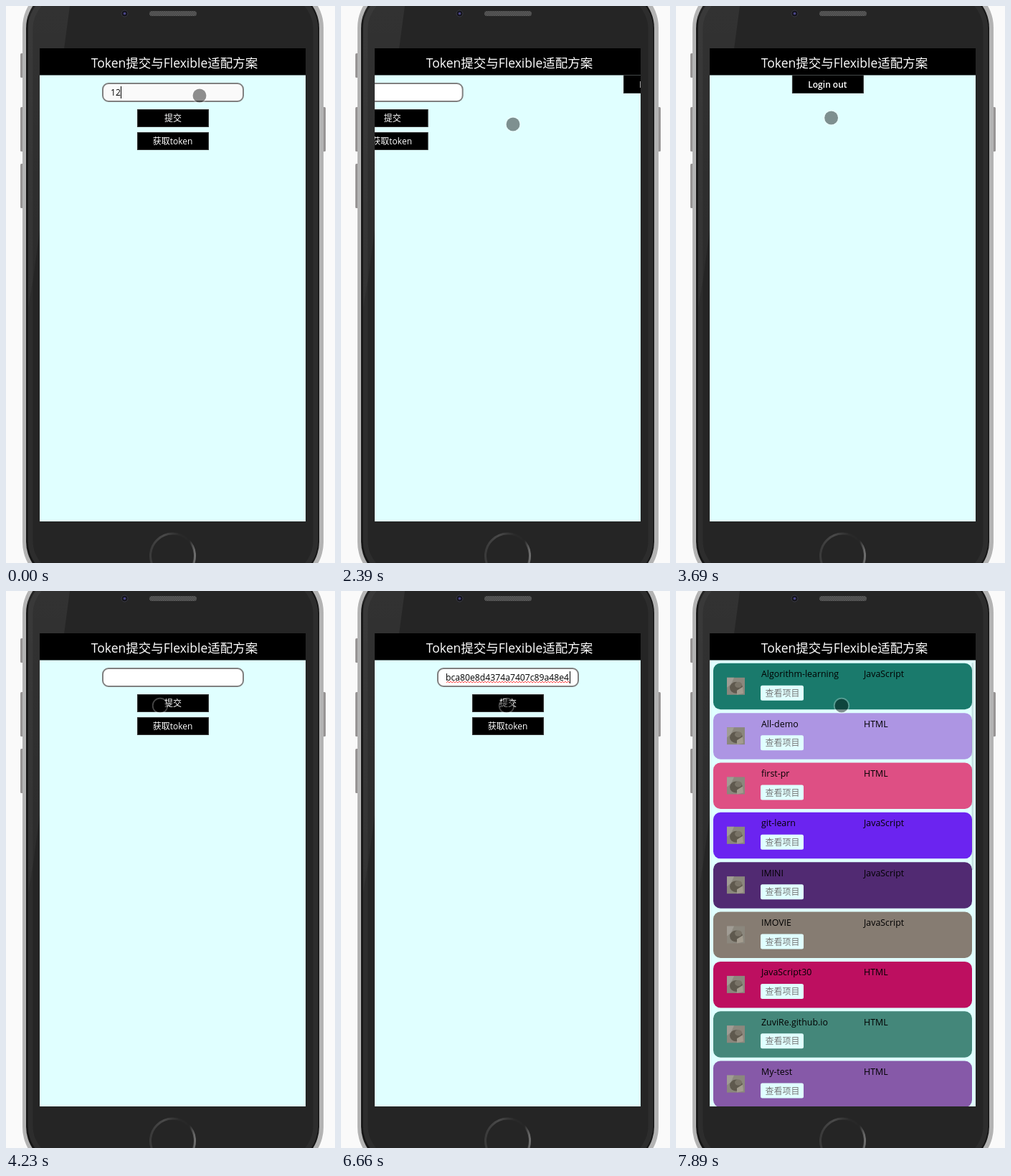
An HTML page for the animation above (8 s loop, 459 by 777 pixels).

```html
<!DOCTYPE html>
<html lang="zh">
<head>
<meta charset="utf-8">
<title>Token</title>
<style>
  html, body { margin: 0; width: 100%; height: 100%; overflow: hidden; background: #fafafa; }
  svg { display: block; }
  text { font: 12px "Open Sans", "Noto Sans CJK SC", "Noto Sans CJK", sans-serif; white-space: pre; }
  .mid { text-anchor: middle; fill: #fff; }
  #title { font-size: 17.5px; }
  #typed { font-size: 12.2px; }
  .label { font-size: 12.4px; }
  .open { fill: #777; }
</style>
</head>
<body>
<svg width="459" height="777" viewBox="0 0 459 777">
  <defs>
    <linearGradient id="shine" x2="0" y2="1">
      <stop stop-color="#fff" stop-opacity=".06"/>
      <stop offset="1" stop-color="#fff" stop-opacity=".03"/>
    </linearGradient>
    <linearGradient id="homeRing">
      <stop stop-color="#3a3a3a"/>
      <stop offset=".3" stop-color="#4a4a4a"/>
      <stop offset=".65" stop-color="#2a2a2a"/>
      <stop offset=".88" stop-color="#262626"/>
      <stop offset="1" stop-color="#707070"/>
    </linearGradient>
    <pattern id="mesh" width="3" height="3" patternUnits="userSpaceOnUse">
      <rect width="3" height="3" fill="#3c3c3c"/>
      <path d="M0 0h1.5v1.5h-1.5zM1.5 1.5h1.5v1.5h-1.5z" fill="#666"/>
    </pattern>
    <g id="avatar">
      <rect width="25" height="24" fill="#8b877d"/>
      <path d="M0 0h10l-4 9-6 5z" fill="#a09c94"/>
      <ellipse cx="13" cy="14" rx="9" ry="8" fill="#5f594e"/>
      <ellipse cx="16" cy="10" rx="5" ry="4" fill="#7a7468"/>
      <path d="M14 18l8-5 1 9-9 2z" fill="#a39c8f"/>
    </g>
  </defs>

  <g fill="#979494">
    <rect x="20" y="66" width="5" height="34" rx="1.5"/>
    <rect x="20" y="141" width="5" height="62" rx="1.5"/>
    <rect x="20" y="220" width="5" height="62" rx="1.5"/>
    <rect x="441" y="141" width="5" height="62" rx="1.5"/>
  </g>
  <rect x="23" y="-30" width="420" height="838" rx="60" fill="#b3b3b3"/>
  <rect x="28" y="-25" width="409" height="828" rx="56" fill="#161616"/>
  <rect x="30.5" y="-22" width="405" height="822" rx="54" fill="#2d2d2d"/>
  <rect x="37.5" y="-16" width="391" height="810" rx="48" fill="#252525"/>
  <path d="M31 0H89L38 380L31 420z" fill="url(#shine)"/>
  <circle cx="165.500" cy="10.500" r="4.500" fill="#15151d" stroke="#3b3b44"/>
  <circle cx="165.500" cy="10.500" r="1.800" fill="#4b4688"/>
  <rect x="200" y="7" width="66" height="7" rx="3.500" fill="url(#mesh)"/>
  <circle cx="232.500" cy="767" r="31" fill="none" stroke="url(#homeRing)" stroke-width="3"/>

  <rect x="47" y="59" width="371" height="38" fill="#000"/>
  <text id="title" class="mid" x="235" y="86">Token提交与Flexible适配方案</text>

  <svg x="47" y="96.500" width="371" height="622.500" viewBox="47 96.500 371 622.500">
    <rect x="47" y="96" width="371" height="623" fill="#e0ffff"/>
    <g id="form">
      <rect id="field" x="135" y="108" width="196" height="25" rx="8" fill="#fff" stroke="#808080" stroke-width="2"/>
      <text id="typed" x="146" y="125"></text>
      <path id="squiggle" fill="none" stroke="#f33" stroke-width=".9"/>
      <rect id="caret" y="112" width="1" height="17"/>
      <rect x="183.500" y="144.500" width="99" height="24" stroke="#333"/>
      <text class="mid" x="233" y="161">提交</text>
      <rect x="183.500" y="176.500" width="99" height="24" stroke="#333"/>
      <text class="mid" x="232.500" y="193">获取token</text>
    </g>
    <g id="logout">
      <rect x="208.500" y="96.500" width="99" height="25" stroke="#333"/>
      <text class="mid" x="257.500" y="113.500" font-weight="600" style="font-weight:600">Login out</text>
    </g>
    <g id="list"></g>
    <rect id="scrollbar" x="412.500" y="100" width="2.500" height="289" rx="1.200"/>
    <g id="status">
      <path d="M46.500 719.500V697.500H165.500q3 0 3 3V719.500z" fill="#f2f2f2" stroke="#c6cccc"/>
      <text x="50" y="713" fill="#555">正在等待 api.github...</text>
    </g>
  </svg>

  <g id="touch">
    <circle r="9.500" fill-opacity=".435"/>
    <circle r="10.300" fill="none" stroke="#fff" stroke-opacity=".27" stroke-width="1.800"/>
  </g>
</svg>

<script>
const $ = id => document.getElementById(id);
const LOOP = 8000, WIDTH = 371, SLIDE = 322;
const TOKEN = 'bca80e8d4374a7407c89a48e4';

const ticks = [0, 270, 420, 570, 880, 1040, 1190, 1350, 1510, 1660, 1820,
  1970, 2110, 2250, 2390, 2510, 2670, 3380, 3540, 3680, 3820, 3960, 4090, 4230,
  4510, 4660, 5060, 5590, 5740, 6020, 6180, 6340, 6500, 6660,
  6960, 7080, 7220, 7350, 7500, 7770, 7890];

// Touch pointer: time, x, y
const path = [[0, 270, 125], [570, 265, 137], [1820, 240, 160], [2110, 240, 165],
  [2510, 240, 165], [2670, 228, 160], [3380, 217, 155], [3540, 217, 155],
  [4230, 215, 160], [4660, 232, 122], [5740, 232, 122], [6660, 231, 160], [LOOP, 231, 160]];

const repos = [
  ['Algorithm-learning', 'JavaScript', '#1a7a6c'],
  ['All-demo', 'HTML', '#ad95e3'],
  ['first-pr', 'HTML', '#de4f84'],
  ['git-learn', 'JavaScript', '#6b24f0'],
  ['IMINI', 'JavaScript', '#512a72'],
  ['IMOVIE', 'JavaScript', '#867c72'],
  ['JavaScript30', 'HTML', '#bd0f60'],
  ['ZuviRe.github.io', 'HTML', '#44877a'],
  ['My-test', 'HTML', '#8659a8'],
];

$('list').innerHTML = repos.map(([name, language, color], i) => `
  <g transform="translate(0 ${100.8 + 69.35 * i})">
    <rect x="52" width="361" height="64.5" rx="10" fill="${color}"/>
    <use href="#avatar" x="71" y="20"/>
    <text class="label" x="119" y="19.500">${name}</text>
    <text class="label" x="262" y="19.500">${language}</text>
    <rect x="118" y="31" width="60" height="21" rx="2.500" fill="#e0ffff"/>
    <text class="open" x="124.500" y="46">查看项目</text>
  </g>`).join('');
$('squiggle').setAttribute('d', 'M147 128' + 'l2 -2 2 2'.repeat(43));

const within = (t, from, to) => t >= from && t < to;
const show = (id, on) => $(id).style.display = on ? '' : 'none';
const move = (id, x, y = 0) => $(id).setAttribute('transform', `translate(${x} ${y})`);
const slide = (t, start) => Math.min(1, Math.max(0, (t - start) / SLIDE));

function pointer(t) {
  const i = path.findIndex(key => key[0] > t);
  const [t0, x0, y0] = path[i - 1], [t1, x1, y1] = path[i];
  const k = (t - t0) / (t1 - t0);
  return [x0 + (x1 - x0) * k, y0 + (y1 - y0) * k];
}

function drawField(t) {
  const pasted = t >= 5740;
  const text = t < 270 ? '12' : t < 2110 ? '123' : pasted ? TOKEN : '';
  $('typed').textContent = text;
  $('field').setAttribute('fill', t < 1970 ? '#fafafa' : '#fff');
  show('squiggle', pasted);
  $('caret').setAttribute('x', pasted ? 319 : 146 + 7 * text.length);
  show('caret', t < 880 || within(t, 1350, 1820) || within(t, 5060, 5590) ||
    within(t, 5740, 6180) || within(t, 6660, 6960));
}

function draw(t) {
  const first = slide(t, 2250), back = slide(t, 3640), second = slide(t, 7000);
  // Pages leave to the left and enter from the right.
  const formX = t < 3640 ? -WIDTH * first : WIDTH * (1 - back) - WIDTH * second;
  const enter = t < 5000 ? first : second;
  const logoutX = 329 * (1 - enter) - (t < 5000 ? WIDTH * back : 0);
  const loaded = t >= 7500;

  drawField(t);
  move('form', formX);
  move('logout', logoutX);
  show('logout', !loaded);
  show('list', loaded);
  show('scrollbar', loaded);
  $('scrollbar').style.opacity = t < 7770 ? .4 : t < 7890 ? .25 : .12;
  show('status', within(t, 2670, 3540));
  move('touch', ...pointer(t));
}

function frame() {
  const now = performance.now() % LOOP;
  draw(ticks.filter(tick => tick <= now).pop());
  requestAnimationFrame(frame);
}
frame();
</script>
</body>
</html>
```
